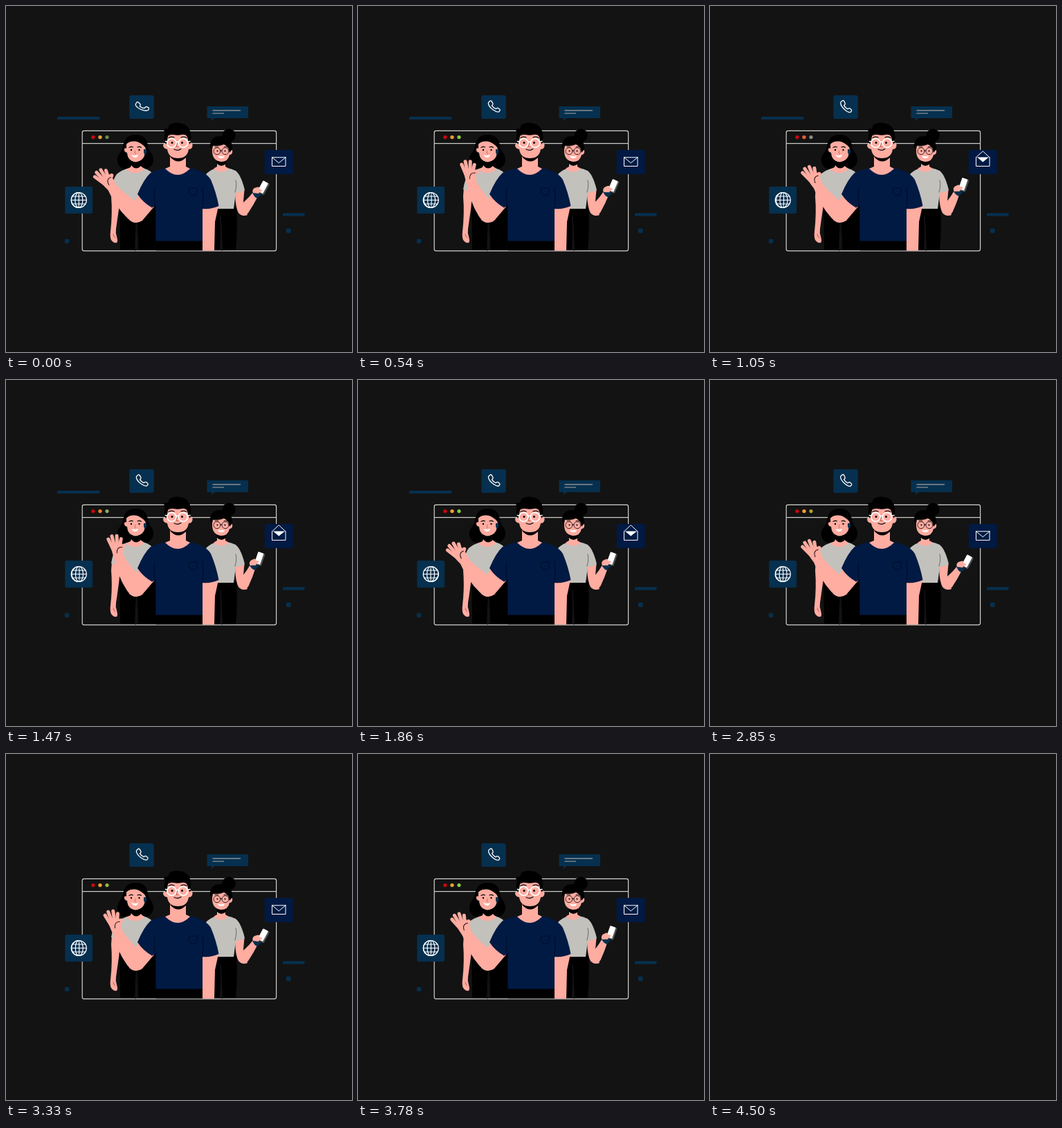
These frames come from a looping animation (500x500 px, 4530 ms). An HTML page:

```html
<!DOCTYPE html>
<html lang="en">
<head>
<meta charset="utf-8">
<title>Team greeting</title>
<style>
  html, body { margin: 0; width: 100%; height: 100%; overflow: hidden; background: #131313; }
  svg { display: block; width: 100%; height: 100%; }
  .skin { fill: #ffaca1; }
  .grey { fill: #c3c1bc; }
  .navy { fill: #011a44; }
  .tile { fill: #06304f; }
  .line { fill: none; stroke-linecap: round; stroke-linejoin: round; }
  .ink { stroke: #050508; }
  .white { stroke: #fff; }
</style>
</head>
<body>
<svg viewBox="0 0 500 500" xmlns="http://www.w3.org/2000/svg">
<rect width="500" height="500" fill="#131313"/>
<g id="scene">
  <!-- decorations -->
  <g class="tile">
    <rect id="bar" x="74" y="160" width="61.5" height="4" rx="1"/>
    <rect x="400" y="299.3" width="31.5" height="4.2" rx="1"/>
    <rect x="85" y="336.8" width="6.2" height="6.2" rx="1.4"/>
    <rect x="405" y="321.6" width="6.6" height="6.4" rx="1.4"/>
    <rect x="178.3" y="129" width="35.4" height="34" rx="2.5"/>
    <path d="M290.5 145H350V162H301.5L297 166V162H290.5Z"/>
  </g>
  <path class="line" d="M299 151H338.5M299 155.2H314.5" stroke="#8b8f94" stroke-width="1.3"/>
  <g id="phone"><path class="line white" stroke-width="1.3" d="M-7.5-6L-5-8Q-4-8.5-3-7L-1.5-4Q-1-3-2-2L-3-1Q-1 2.5 2.5 4L4 3Q5 2.5 6 3L8 4.8Q9 5.8 8 7L6.8 8.3Q4 9.3-1 5.5Q-7.5.5-8-4Q-8-5.3-7.5-6Z"/></g>

  <!-- window -->
  <rect x="110.2" y="180.4" width="280.4" height="173.4" rx="2.5" class="line" stroke="#d2d2d0" stroke-width="1.2"/>
  <path d="M110 198.6H390.5" stroke="#c9c9c7" stroke-width="1.2"/>
  <circle cx="126" cy="189.6" r="2.7" fill="#c4090f"/>
  <circle id="amber" cx="136" cy="189.6" r="2.7"/>
  <circle id="green" cx="146" cy="189.6" r="2.6"/>

  <!-- left woman -->
  <path d="M187 186C176 186 170 192 169 204C167 212 160 214 161 224C162 235 172 238 188 237C204 238 213 232 213 222C213 213 207 211 205 204C205 193 200 186 187 186Z"/>
  <path d="M164 281H216L217 353H191L190 312L186 353H165Z"/>
  <path d="M189 308Q187 330 187 353" class="line" stroke="#131313" stroke-width="1.5"/>
  <path class="skin" d="M153 262L166 262Q164 292 159 322Q158 328 160 333Q162 340 160 342Q155 343 152 338Q150 334 151 326Q154 300 152 275Z"/>
  <path d="M155 330Q156 334 158 335" class="line" stroke="#7c3d3c" stroke-width=".7"/>
  <path class="grey" d="M178 234Q187 239 197 234Q211 237 216 248L218 283H166L165 268Q158 268 152 265Q154 251 160 243Q167 237 178 234Z"/>
  <path class="skin" d="M181 221H194V231Q197 233 200 235Q188 247 173 236Q181 234 181 230Z"/>
  <path d="M181 222Q187 229 194 222V232Q187 238 181 230Z"/>
  <path class="skin" d="M174 198Q187 192 200 199Q203 205 201 211Q200 224 188 225Q176 225 175 212Q170 211 171 206Q172 204 174 206Z"/>
  <path d="M172 207Q173 196 183 195Q191 195 198 201Q202 204 203 209Q207 195 196 189Q182 184 173 194Q169 200 172 207Z"/>
  <path d="M199 207H203Q204 212 201 215Q199 214 199 210Z" fill="#06304f"/>
  <g id="faceL">
    <circle cx="181" cy="208" r="1.2"/><circle cx="192.5" cy="208" r="1.2"/>
    <path class="line ink" d="M178 204.5Q181 202.5 183.5 204M190 204Q193 202.5 195.5 204.5" stroke-width="1.1"/>
    <path class="line" d="M187 209L186 213H188" stroke="#b95f58" stroke-width=".7"/>
    <path d="M181.5 215Q186 217 191 215Q190 219 186.5 219Q183 219 181.5 215Z" fill="#fff"/>
  </g>

  <!-- right woman -->
  <circle cx="322.3" cy="187" r="9.6"/>
  <path d="M301 291H333Q335 322 332 353H313L311 312L309 353H300Z"/>
  <path d="M310 304L312 353" class="line" stroke="#131313" stroke-width="1.5"/>
  <path class="skin" d="M331 266L344.500 266L343 282L349 302Q341 305 336 299Q331 290 331 266Z"/>
  <g id="armR">
    <path class="skin" d="M336 298Q343 306 350 299Q358 287 364 275L358 268Q351 277 344 283Z"/>
    <path d="M356 269L361 266L369 273L363 278Q358 276 356 269Z" class="tile"/>
    <g transform="rotate(28 372 262)">
      <rect x="368.500" y="253.500" width="9.300" height="18.500" rx="1.500" fill="#4d5354"/>
      <rect x="367" y="253.500" width="8.500" height="17" rx="1" fill="#fff"/>
    </g>
    <path class="skin" d="M357 270Q355 266 359 263L364 261.500Q368 262 366 264.500L370 265.500Q371 268 367 268.500L365 271Z"/>
  </g>
  <path class="grey" d="M304 234Q311 239 319 234Q333 236 337 244Q342 253 345 266Q339 270 332 270L329 293H300L285 250Q289 239 304 234Z"/>
  <path d="M331 269Q334 259 332 252" class="line" stroke="#55534f" stroke-width=".8"/>
  <path class="skin" d="M305 221H317V232L322 235Q311 244 300 235L305 232Z"/>
  <path d="M304 222Q311 227 318 222V228Q311 234 305 228Z"/>
  <path class="skin" d="M298 199Q311 194 325 201L324 208Q328 207 327 212Q326 215 323 215Q321 225 311 225Q299 224 298 211Z"/>
  <path d="M295 204Q294 188 310 188Q327 187 327 207L323 212Q322 203 315 200Q308 203 299 202L298 207Z"/>
  <g class="line ink" stroke-width=".8">
    <circle cx="305" cy="209.700" r="5"/><circle cx="317" cy="209.700" r="5"/>
    <path d="M310 209Q311 208 312 209M302 203.700Q304 202.500 307 203.500M315 203.500Q318 202.500 320 204"/>
  </g>
  <circle cx="305.500" cy="209.500" r="1.100"/><circle cx="316.500" cy="209.500" r="1.100"/>
  <path d="M306 216.500Q311 218 316 216.500Q315 220 311 220Q307 220 306 216.500Z" fill="#fff"/>

  <!-- man -->
  <path class="skin" d="M283 289H307L302 312L301 353.500H283.500Z"/>
  <rect x="217" y="338" width="67" height="15.300"/>
  <path class="skin" d="M192 272L214 290L197 310Q187 317 178 309Q179 294 192 272Z"/>
  <g id="foreArm">
    <path class="skin" d="M146.500 264L157 256Q172 273 194 286L198 309Q186 317 176 307Q158 290 146.500 264Z"/>
    <g id="hand">
      <path class="skin" d="M-8-17L9-16Q10-8 7 4Q1 8-6 4Q-8-4-8-17Z"/>
      <g id="fingers" class="line" stroke="#ffaca1"></g>
      <path class="line" d="M8-11Q0-13-1-4" stroke="#2a1218" stroke-width="1"/>
    </g>
  </g>
  <path class="navy" d="M231 234Q248 246 266 234Q289 239 296 251Q304 270 307.500 289Q297 294 284 293V339.500H216.500V288L211 291.500Q198 284 190 272Q199 250 209 241Q217 237 231 234Z"/>
  <path class="line" stroke="#000a22" stroke-width="1" d="M216 290Q213 278 215 264M284 293Q286 277 284 262M265 263H276V271Q271 277 265 271Z"/>
  <path class="skin" d="M237 216H260V232L266 235Q248 253 230 235L237 232Z"/>
  <path d="M237 216Q248 222 260 216V219Q249 230 238 219Z"/>
  <path class="skin" d="M232 188Q248 182 265 188V198Q270 196 269.500 202Q269 207 264 207Q262 220 248.500 220Q235 220 233 207Q227 206 227 201Q228 197 232 199Z"/>
  <path d="M231 200Q227 190 230 184Q227 180 229.500 177Q236 179 235 173Q241 168 250 169Q261 170 265 178Q269 187 266 200L263 195Q263 188 258 185Q246 189 236 184Q233 189 233 197Z"/>
  <g class="line ink" stroke-width="1.300">
    <path d="M235 190.500Q239 188 243 190M253 190Q257 188 261 190.500"/>
    <path d="M243 207Q248 210 253 206.500" stroke-width="1.100"/>
  </g>
  <path class="line" d="M247.500 198L246 203.500H249" stroke="#b95f58" stroke-width=".9"/>
  <circle cx="240" cy="197.500" r="1.500"/><circle cx="254.500" cy="197.500" r="1.500"/>
  <g class="line white" stroke-width="1.600">
    <circle cx="239.300" cy="198" r="6.500"/><circle cx="256" cy="198" r="6.500"/>
    <path d="M246 197Q247.700 195.500 249.400 197M232.500 196L230.500 195.500M262.500 196L266 195.500"/>
  </g>

  <!-- front tiles -->
  <rect class="tile" x="85.300" y="261" width="39.800" height="39" rx="2.500"/>
  <g class="line white" stroke-width="1.200">
    <circle cx="105.300" cy="280.500" r="11"/>
    <path d="M94.300 280.500H116.300M96 275H114.600M96 286H114.600"/>
    <path id="meridians"/>
  </g>
  <rect class="navy" x="373.700" y="208" width="41" height="35" rx="2.500"/>
  <path id="letter" d="M386 218.500H403L394.300 225.500Z" fill="#fff"/>
  <path class="line white" d="M384.500 218.800V231.500H404V218.800" stroke-width="1"/>
  <path id="flap" class="line white" stroke-width="1"/>
  <path id="lid" class="line white" stroke-width="1" d="M384.500 218.800H404"/>
</g>
</svg>
<script>
const LOOP = 4530, BLANK = 4500, CYCLE = 3000;
const $ = id => document.getElementById(id);
const set = (id, name, value) => $(id).setAttribute(name, value);
const ease = (a, b, t) => {
  const x = Math.min(1, Math.max(0, (t - a) / (b - a)));
  return x * x * (3 - 2 * x);
};
const turn = (deg, x, y) => `rotate(${deg} ${x} ${y})`;

// angle, length and width of each finger, thumb last
const fingers = [[-21, 30, 5], [-8, 32, 5], [6, 31, 5], [20, 27, 5], [40, 19, 5.5]];
$('fingers').innerHTML = fingers.map(([deg, len, w], i) =>
  `<path d="M${i * 3 - 5.5}-10L${Math.sin(deg * Math.PI / 180) * (len - w / 2)} ${-Math.cos(deg * Math.PI / 180) * (len - w / 2)}" stroke-width="${w}"/>`
).join('');

const greens = [[0, 106, 140, 78], [540, 139, 204, 74], [1050, 138, 138, 138], [1860, 139, 204, 74],
  [2850, 174, 160, 50], [3780, 139, 204, 74], [LOOP, 106, 140, 78]];
const ambers = [[0, 240, 160, 48], [540, 243, 155, 45], [1050, 226, 100, 48], [1860, 243, 160, 45], [LOOP, 240, 160, 48]];
function tint(keys, t) {
  const i = keys.findIndex(k => k[0] > t), a = keys[i - 1], b = keys[i];
  const p = (t - a[0]) / (b[0] - a[0]);
  return `rgb(${[1, 2, 3].map(n => Math.round(a[n] + (b[n] - a[n]) * p))})`;
}

function globe(t) {
  const r = 11, shift = t / 470 % 1 * 0.5;
  let d = '';
  for (let u = -1 + shift; u < 1; u += 0.5) {
    d += `M105.3 269.5A${Math.max(0.01, Math.abs(u * r))} ${r} 0 0 ${u > 0 ? 1 : 0} 105.3 291.5`;
  }
  return d;
}

function draw(t) {
  set('scene', 'visibility', t < BLANK ? 'visible' : 'hidden');
  set('bar', 'opacity', t < 2760 ? 1 : 0);

  const wave = 0.5 - 0.5 * Math.cos(t / 900 * 2 * Math.PI);
  set('foreArm', 'transform', turn(16 * wave, 188, 300));
  set('hand', 'transform', `translate(152 261) rotate(${-38 + 18 * wave})`);

  const c = t % CYCLE;
  const lift = ease(300, 780, c) - ease(1700, 2750, c);
  set('armR', 'transform', turn(-9 * lift, 342, 295));

  const ring = -(18 * Math.exp(-t / 350) + 2) * Math.cos(t / 300 * 2 * Math.PI);
  set('phone', 'transform', `translate(196.500 144.800) rotate(${ring})`);

  set('meridians', 'd', globe(t));

  const open = ease(800, 1030, c) - ease(2250, 2500, c);
  set('flap', 'd', `M384.500 218.800L394.300 ${226.8 - 17 * open}L404 218.800`);
  set('letter', 'opacity', ease(0.4, 1, open));
  set('lid', 'opacity', 1 - open);

  set('green', 'fill', tint(greens, t));
  set('amber', 'fill', tint(ambers, t));
}

const start = performance.now();
function tick() {
  draw((performance.now() - start) % LOOP);
  requestAnimationFrame(tick);
}
draw(0);
requestAnimationFrame(tick);
</script>
</body>
</html>
```
